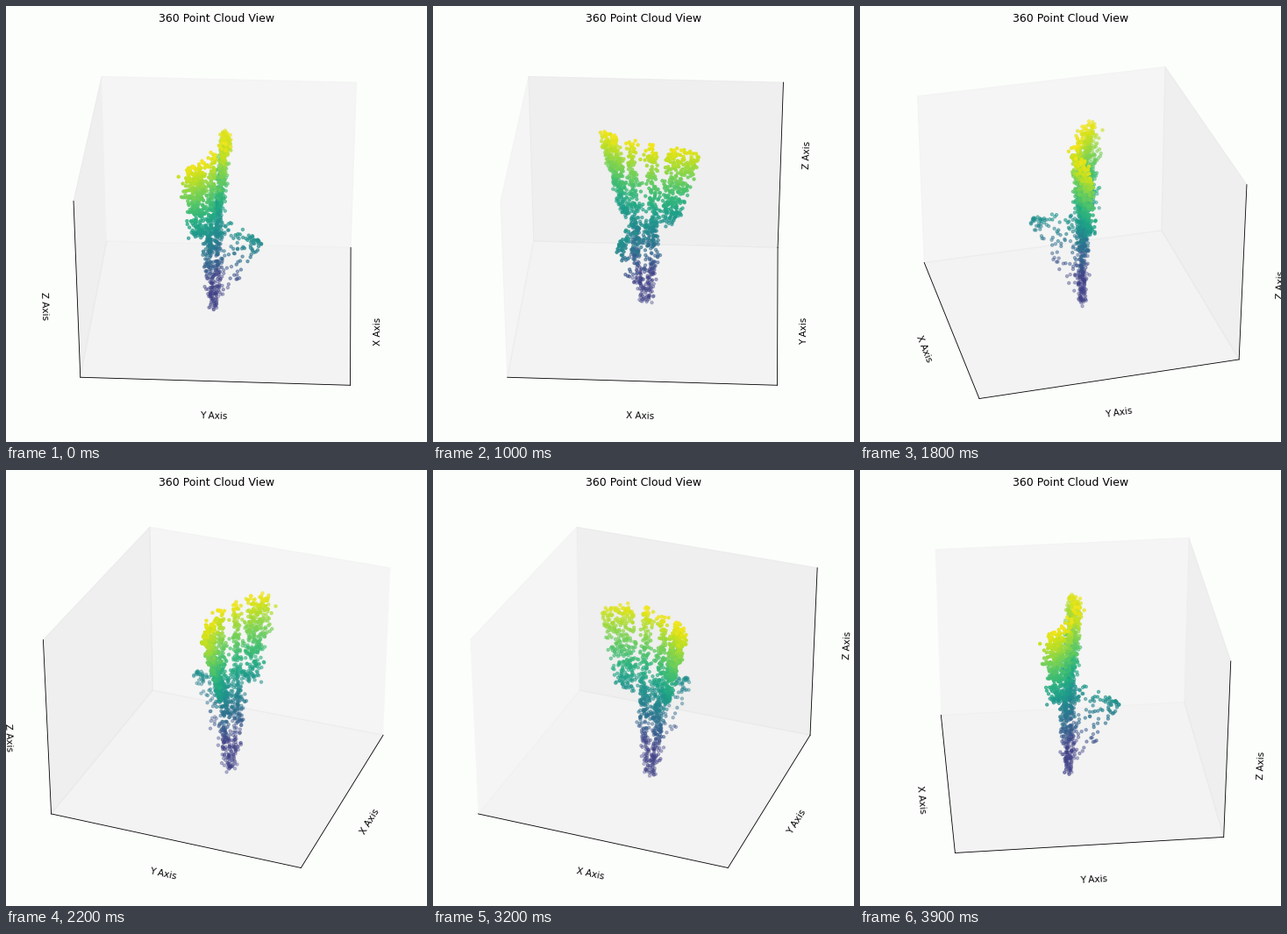
Recreate the animation shown at these times as a matplotlib script. Size 480 by 497 pixels, loop 4 s.

```python
import numpy as np
import matplotlib.pyplot as plt
from matplotlib.animation import FuncAnimation

W, H, DPI = 480, 497, 75
BG = "#fcfefc"
FRAMES, STEP, START = 40, 9, 3
HALF_XY, HALF_Z = 0.5952, 0.4464
Z_TOP, Z_END = 0.43, -0.43
MID = 0.036  # centre line of the body across the wings

rng = np.random.default_rng(12)


def half_width(z):
    return 0.136 + 0.26 * z


def spine(z):
    return np.interp(z, [-0.1, Z_TOP], [-0.03, 0.0])


def shell(off, z):
    """Depth of the curved wing sheet at an offset from the centre line."""
    bend = np.interp(z, [-0.05, Z_TOP], [0.05, 0.085])
    return spine(z) + 0.008 + 0.11 * off - bend * (off / half_width(z)) ** 2


def jitter(n, size):
    return rng.normal(0, size, n)


def arm(side, n):
    z = 0.43 * rng.random(n) ** 0.85
    width = np.interp(z, [0, 0.4], [0.055, 0.12])
    off = side * (half_width(z) - width * rng.random(n))
    depth = shell(off, z) + jitter(n, 0.012)
    droop = 0.05 if side < 0 else 0.025
    z -= droop * (off / half_width(z)) ** 2 * np.interp(z, [0.1, 0.35], [0, 1])
    return MID + off, depth, z + jitter(n, 0.009)


def strip(side, n):
    z = rng.uniform(Z_END, Z_TOP - 0.01, n)
    off = side * np.interp(z, [Z_END, -0.2, 0.1], [0.012, 0.045, 0.05])
    off = off + jitter(n, 0.014)
    return MID + off, spine(z) + 0.004 + jitter(n, 0.01), z


def web(n):
    z = -0.12 + 0.5 * rng.random(n) ** 1.3
    reach = np.where(z < 0, 0.06, half_width(np.maximum(z, 0)))
    off = reach * rng.uniform(-0.9, 0.9, n)
    return MID + off, shell(off, z) + jitter(n, 0.012), z


def fin(n):
    out = -0.03 + 0.245 * rng.random(n) ** 1.9
    low = np.interp(out, [-0.03, 0.05, 0.13, 0.215], [-0.41, -0.3, -0.2, -0.03])
    high = np.interp(out, [-0.03, 0.215], [0.05, 0.0])
    z = low + (high - low) * rng.random(n)
    side = rng.choice([-1, 1], n)
    off = side * 0.045 * (1 - (out + 0.03) / 0.25) * np.interp(z, [-0.4, -0.15], [0.3, 1])
    return MID + off + jitter(n, 0.007), out, z


parts = [arm(-1, 255), arm(1, 285), strip(-1, 205), strip(1, 205), web(190), fin(150)]
across, out, z = np.hstack(parts)
z = np.clip(z, Z_END, Z_TOP)
x = 0.906 * across + 0.42 * out
y = -0.42 * across + 0.906 * out
shade = np.maximum(z, -0.26)

fig = plt.figure(figsize=(6.4, 6.6267), dpi=DPI, facecolor=BG)
pad, side = 7.5, 465
ax = fig.add_axes([pad / W, pad / H, side / W, side / H], projection="3d", facecolor=BG)
ax.scatter(x, y, z, c=shade, cmap="viridis", s=10, vmin=Z_END, vmax=Z_TOP)
ax.set(xlim=(-HALF_XY, HALF_XY), ylim=(-HALF_XY, HALF_XY), zlim=(-HALF_Z, HALF_Z),
       xticks=[], yticks=[], zticks=[],
       xlabel="X Axis", ylabel="Y Axis", zlabel="Z Axis",
       title="360 Point Cloud View")
for axis, grey in ((ax.xaxis, 0.933), (ax.yaxis, 0.885), (ax.zaxis, 0.912)):
    axis.set_pane_color((grey, grey, grey, 0.5))


def update(i):
    ax.view_init(elev=30, azim=START + STEP * i)
    return []


anim = FuncAnimation(fig, update, frames=FRAMES, interval=100, repeat=True, repeat_delay=0)
plt.show()
```
